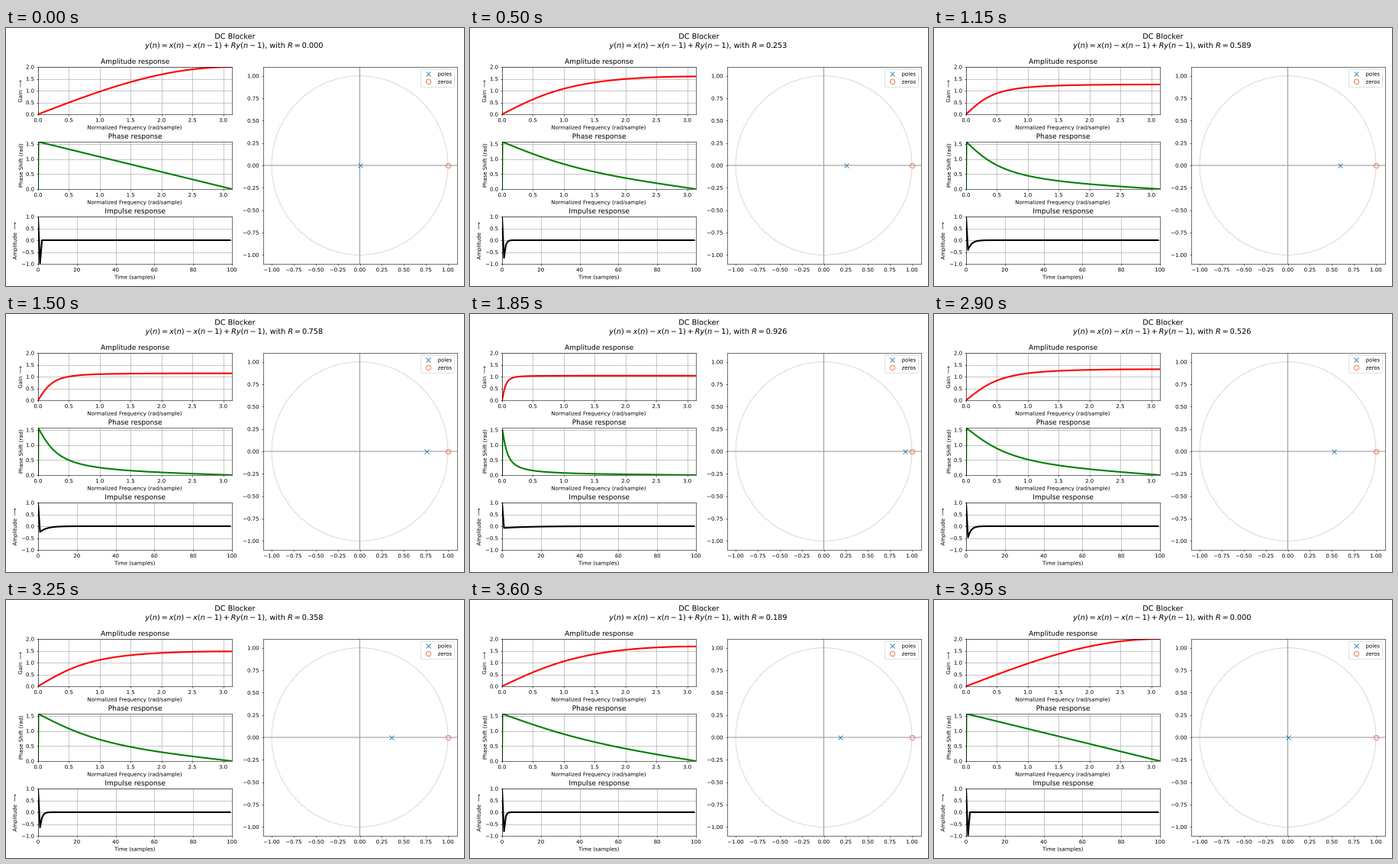
Recreate the animation shown at these times as a matplotlib script. Size 600 px wide and 338 px high, loop 4000 ms.

```python
import numpy as np
import matplotlib.pyplot as plt
from matplotlib.animation import FuncAnimation
from matplotlib.patches import Circle
from matplotlib.patheffects import Normal
from matplotlib.text import Text

W, H, DPI = 600, 338, 50
FRAMES, INTERVAL = 80, 50
SWEEP = 96  # steps of R up and back down, at 24 per second

plt.rcParams.update({"font.family": "DejaVu Sans", "font.size": 10,
                     "text.hinting": "none", "grid.linewidth": 1})
fig = plt.figure(figsize=(W / DPI, H / DPI), dpi=DPI, facecolor="white")


def add_axes(left, top, right, bottom):
    return fig.add_axes([left / W, 1 - bottom / H,
                         (right - left) / W, (bottom - top) / H])


def response_axes(top, title, xlabel, ylabel, xlim, ylim, xticks, yticks):
    ax = add_axes(42, top, 296, top + 62)
    ax.set_title(title, fontsize=13)
    ax.set(xlabel=xlabel, ylabel=ylabel, xlim=xlim, ylim=ylim,
           xticks=xticks, yticks=yticks)
    ax.grid(True)
    return ax


def heading(baseline, text=""):
    return fig.text(0.5, 1 - baseline / H, text, fontsize=14,
                    ha="center", va="baseline")


FREQ = "Normalized Frequency (rad/sample)"
freq_ticks = np.arange(0, 3.1, 0.5)
amp_ax = response_axes(51, "Amplitude response", FREQ,
                       r"Gain $\longrightarrow$", (0, np.pi), (0, 2),
                       freq_ticks, np.arange(0, 2.1, 0.5))
phase_ax = response_axes(149, "Phase response", FREQ,
                         "Phase Shift (rad)", (0, np.pi), (0, np.pi / 2),
                         freq_ticks, np.arange(0, 1.6, 0.5))
imp_ax = response_axes(247, "Impulse response", "Time (samples)",
                       r"Amplitude $\longrightarrow$", (0, 100), (-1, 1),
                       np.arange(0, 101, 20), np.arange(-1, 1.1, 0.5))

w = np.linspace(0, np.pi, 512, endpoint=False)
z1 = np.exp(-1j * w)
n = np.arange(100)
amp_line, = amp_ax.plot([], [], "r", lw=3)
phase_line, = phase_ax.plot([], [], "g", lw=3)
imp_line, = imp_ax.plot([], [], "k", lw=3)

# Pole-zero plane
pz_ax = add_axes(336.5, 51, 590.5, 309)
pz_ax.add_patch(Circle((0, 0), 1, fill=False, ec="black", ls="dotted", lw=1,
                       alpha=0.55))
pz_ax.axvline(0, color="0.6", snap=False)
pz_ax.axhline(0, color="0.6", snap=False)
pole, = pz_ax.plot([0], [0], "x", ms=9, mew=1.2, color="#1f77a8",
                   label="poles")
pz_ax.plot([1], [0], "o", ms=9, mew=1.2, mfc="none", color="#ea6a38",
           ls="none", label="zeros")
ticks = np.arange(-1, 1.1, 0.25)
pz_ax.set(xlim=(-1.1, 1.1), ylim=(-1.1, 1.1), xticks=ticks, yticks=ticks)
pz_ax.legend(loc="upper right")

heading(14.2, "DC Blocker")
formula = heading(26)

# Outlined text keeps its sub-pixel position at this low resolution
for text in fig.findobj(Text):
    text.set_path_effects([Normal()])


def update(i):
    step = round(i * SWEEP / FRAMES)
    r = 1 - abs(1 - 2 * step / (SWEEP - 1))
    h = (1 - z1) / (1 - r * z1)
    impulse = np.where(n == 0, 1.0, (r - 1) * r ** np.maximum(n - 1, 0))

    amp_line.set_data(w, np.abs(h))
    phase_line.set_data(w, np.angle(h))
    imp_line.set_data(n, impulse)
    pole.set_data([r], [0])
    formula.set_text("$y(n) = x(n) - x(n-1) + Ry(n-1)$, "
                     f"with $R = {r:.3f}$")
    return amp_line, phase_line, imp_line, pole, formula


anim = FuncAnimation(fig, update, frames=FRAMES, interval=INTERVAL,
                     repeat=True, repeat_delay=0)
plt.show()
```
